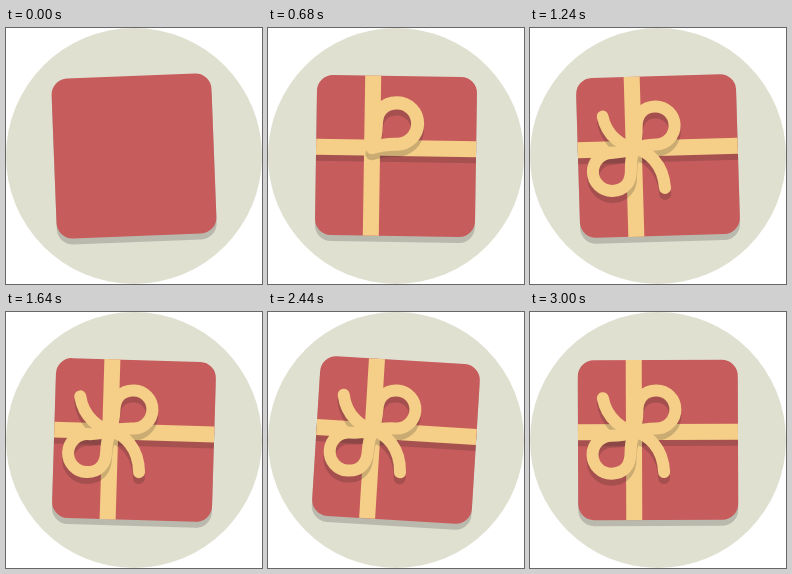
An HTML page that plays this animation: 256 by 256 pixels, repeating every 3.04 s.

```html
<!DOCTYPE html>
<html lang="en">
<head>
<meta charset="utf-8">
<title>Gift box</title>
<style>
  html, body { margin: 0; width: 100%; height: 100%; overflow: hidden; background: #fff; }
  svg { display: block; width: 100vw; height: 100vh; }
  .shade { fill: #231f20; opacity: .2; }
  .ribbon { fill: #f5cf87; }
  .bow { fill: none; stroke: #f5cf87; stroke-width: 12; stroke-linecap: round; stroke-linejoin: round; }
  .bow.shade { stroke: #231f20; }
</style>
</head>
<body>
<svg viewBox="0 0 256 256">
  <circle cx="128" cy="128" r="128" fill="#e0e0d1"/>
  <g id="gift">
    <rect class="shade" x="48" y="54" width="160" height="160" rx="16"/>
    <rect x="48" y="48" width="160" height="160" rx="16" fill="#c75c5c"/>
    <rect id="bandShade" class="shade" x="48" y="118" height="16"/>
    <rect id="band" class="ribbon" x="48" y="112" height="16"/>
    <rect id="strip" class="ribbon" x="96" y="48" width="16"/>
    <g class="bow shade" id="bowShade" transform="translate(104 126)"></g>
    <g class="bow" id="bow" transform="translate(104 120)"></g>
  </g>
</svg>
<script>
const LOOP = 3040, STEP = 40;
const $ = id => document.getElementById(id);

const progress = (t, from, to) => Math.min(1, Math.max(0, (t - from) / (to - from)));
const ease = p => p < .5 ? 2 * p * p : 1 - 2 * (1 - p) ** 2;
// Grows from 0, overshoots and settles at 1
const spring = p => 1 - (1 - p) ** 2 * Math.cos(3 * Math.PI * p);

// A slowing wobble comes to rest leaning right, leans further, then straightens
function tilt(t) {
  const swings = Math.min(3, (t / 460) ** .805);
  return -2.2 * Math.cos(Math.PI * swings)
    + 1.4 * ease(progress(t, 2200, 2480))
    - 3.8 * ease(progress(t, 2780, 3000));
}

const loop = 'M0 0C6 -2 14 -3.5 22.5 -3.5A19 19 0 0 0 22.5 -41.5C10 -41.5 3.5 -33 3.5 -21C3.5 -12 2 -6 0 0';

// Bow pieces, each springing out of the knot
const parts = [
  { d: loop, turn: 0, start: 400, time: 600 },
  { d: loop, turn: 180, start: 660, time: 600 },
  { d: 'M0 0C14 2 29 16 30 40', turn: 0, start: 815, time: 450 },
  { d: 'M0 0C-10 -3 -27 -12 -31 -34', turn: 0, start: 890, time: 450 }
];

for (const part of parts) {
  part.nodes = ['bowShade', 'bow'].map(id => {
    const path = document.createElementNS('http://www.w3.org/2000/svg', 'path');
    path.setAttribute('d', part.d);
    return $(id).appendChild(path);
  });
}

function draw(t) {
  $('gift').setAttribute('transform', `rotate(${tilt(t)} 128 128)`);
  const across = 160 * ease(progress(t, 0, 260));
  $('band').setAttribute('width', across);
  $('bandShade').setAttribute('width', across);
  $('strip').setAttribute('height', 160 * ease(progress(t, 240, 480)));
  for (const { turn, start, time, nodes } of parts) {
    const size = spring(progress(t, start, start + time));
    for (const node of nodes) {
      node.setAttribute('transform', `rotate(${turn}) scale(${size})`);
      node.setAttribute('visibility', size > 0 ? 'visible' : 'hidden');
    }
  }
}

const begin = performance.now();
function frame() {
  const t = (performance.now() - begin) % LOOP;
  draw(Math.floor(t / STEP) * STEP);
  requestAnimationFrame(frame);
}
frame();
</script>
</body>
</html>
```
